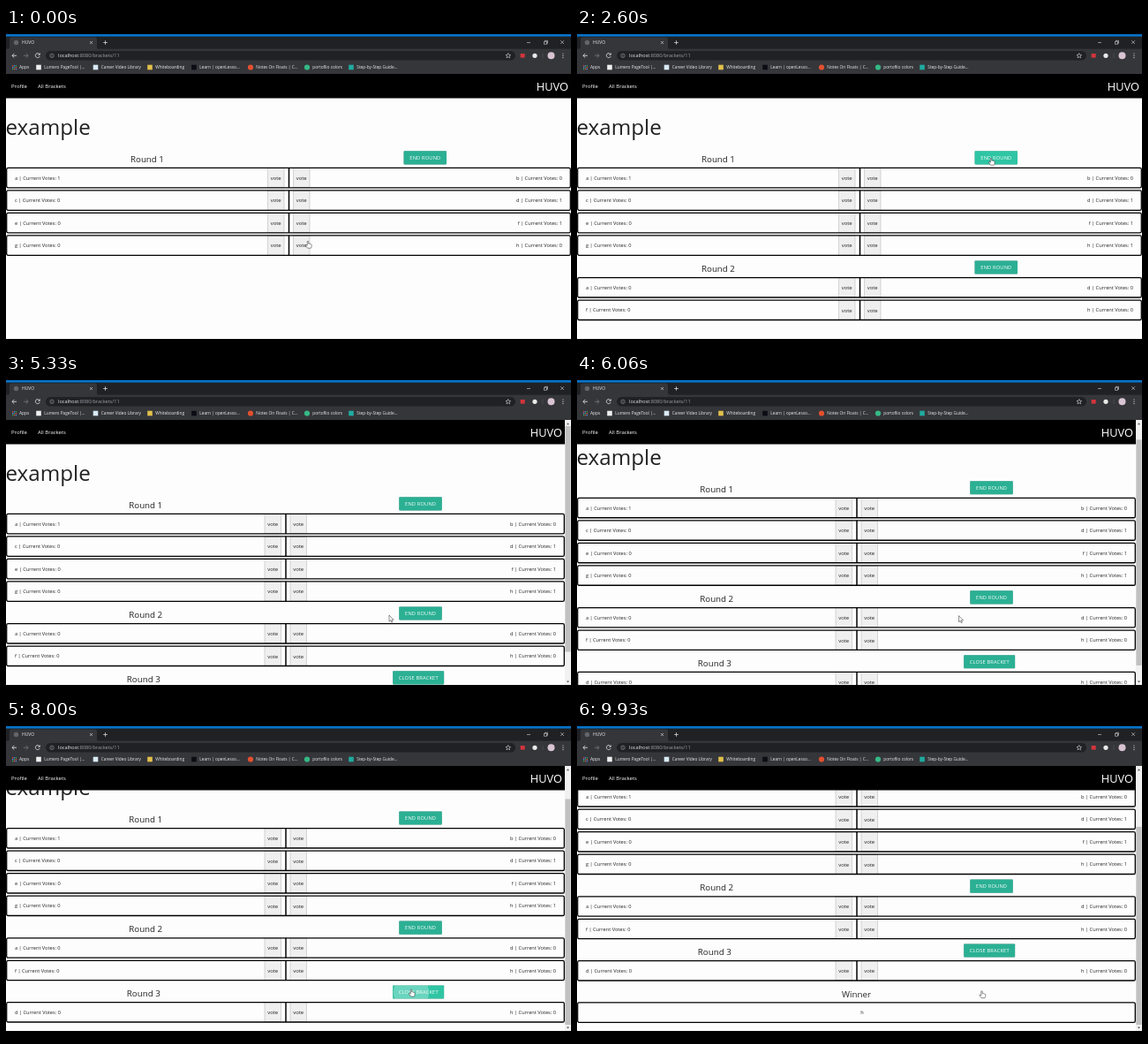
An HTML page that plays this animation: 640 px wide and 360 px high, repeating every 10 s.

```html
<!DOCTYPE html>
<html lang="en">
<head>
<meta charset="utf-8">
<title>Bracket voting</title>
<style>
  html, body { margin: 0; width: 100%; height: 100%; overflow: hidden; background: #000; }
  svg { display: block; width: 640px; height: 360px; }
  text { font-family: "Open Sans", "Noto Sans", sans-serif; white-space: pre; }
  .btn { filter: drop-shadow(0 .8px .6px rgba(0, 0, 0, .35)); }
</style>
</head>
<body>
<svg id="stage" viewBox="0 0 640 360">
  <defs>
    <clipPath id="view"><rect y="79" width="640" height="273"/></clipPath>
    <clipPath id="closeClip"><rect id="closeBox" rx=".8"/></clipPath>
  </defs>
  <rect width="640" height="360"/>
  <rect y="79" width="640" height="273" fill="#fdfdfd"/>
  <g clip-path="url(#view)"><g id="page"></g></g>
  <g id="nav"></g>
  <g id="bar"></g>
  <g id="chrome"></g>
  <g id="cursor">
    <path id="arrow" d="M0 0V7.2L1.7 5.7L2.8 8.2L3.9 7.7L2.8 5.3H5Z" fill="#fff" stroke="#222" stroke-width=".5"/>
    <path id="hand" d="M-.7.6Q0-.4.7.6V3.2L1.5 3Q2 3 2.2 3.4L3 3.3L3.4 3.8Q4.2 3.7 4.2 4.6V6Q4 7.2 3.4 8.2H-.5L-2.6 5.2Q-2.6 4.2-1.7 4.5L-.7 5.4Z" fill="#fff" stroke="#222" stroke-width=".5"/>
  </g>
</svg>
<script>
const LOOP = 10000, INK = "#222";
const VIEW_TOP = 52, VIEW_H = 300;
const $ = id => document.getElementById(id);

// Stage changes: each click reloads the page with new content.
const STAGES = [
  { at: 0,    h: 0, rounds: 1, width: 640, doc: 300 },
  { at: 900,  h: 1, rounds: 1, width: 640, doc: 300 },
  { at: 2530, h: 1, rounds: 2, width: 640, doc: 300 },
  { at: 5030, h: 1, rounds: 3, width: 633, doc: 335.8 },
  { at: 8400, h: 1, rounds: 3, width: 633, doc: 382.8, winner: true }
];
const SCROLL = [[0, 0], [5760, 0], [6330, 33.3], [6460, 35.8], [8700, 35.8], [9270, 82.8]];
const POINTER = [
  [0, 342, 241], [350, 336, 243], [1000, 336, 243], [1600, 469.5, 137], [1850, 469, 147],
  [3600, 469, 147], [4000, 465.5, 272.5], [5080, 465.5, 272.5], [5330, 434, 273],
  [5700, 434, 273], [6330, 431.5, 274], [6780, 431.5, 274], [7100, 459, 306],
  [8000, 459, 304.8], [8250, 458.5, 306.5]
];
const HAND = [[0, 1080], [1480, 3680], [3900, 5130], [7020, LOOP]];
const HOVER = [[1400, 3650], [4020, 5050], [7020, 8400]];
const RIPPLE_AT = 7860;

const ROUNDS = [
  { y: 146.8, label: "END ROUND", w: 48.5, pairs: ["a1 b0", "c0 d1", "e0 f1", "g0 h"] },
  { y: 271,   label: "END ROUND", w: 48.5, pairs: ["a0 d0", "f0 h0"] },
  { y: 343.8, label: "CLOSE BRACKET", w: 58, pairs: ["d0 h0"] }
];

const rect = (x, y, w, h, fill, more = "") =>
  `<rect x="${x}" y="${y}" width="${w}" height="${h}" fill="${fill}" ${more}/>`;
const dot = (x, y, r, fill) => `<circle cx="${x}" cy="${y}" r="${r}" fill="${fill}"/>`;
const line = (d, color, w = .8) =>
  `<path d="${d}" fill="none" stroke="${color}" stroke-width="${w}"/>`;
const text = (x, y, size, s, fill = INK, anchor = "start", more = "") =>
  `<text x="${x}" y="${y}" font-size="${size}" fill="${fill}" text-anchor="${anchor}" ${more}>${s}</text>`;
const frame = (y, w) =>
  rect(.7, y - 11.2, w - 1.4, 22.4, "none", 'rx="1.6" stroke="#000" stroke-width="1.3"');

function match(pair, y, w, hVotes) {
  const [left, right] = pair.split(" ");
  const mid = w / 2;
  const label = p => `${p[0]} | Current Votes: ${p[1] ?? hVotes}`;
  const vote = x => rect(x, y - 11, 18.5, 22, "#efefef", 'stroke="#aaa" stroke-width=".45"') +
    text(x + 9.2, y + 2.3, 5.95, "vote", INK, "middle");
  return vote(mid - 23.5) + vote(mid + 5.5) + frame(y, w) +
    line(`M${mid + .5} ${y - 11.2}v22.4`, "#000", 1.5) +
    text(10, y + 2.1, 5.67, label(left)) +
    text(w - 10, y + 2.1, 5.67, label(right), INK, "end");
}

function round(r, i, st) {
  const side = (st.width - 38 - r.w) / 4 + 2.6;
  const x = st.width - side - r.w;
  let out = text(side, r.y + 5.3, 9.75, `Round ${i + 1}`);
  out += `<g class="btn">${rect(x, r.y - 7.6, r.w, 15.2, "#2bb094", `id="btn${i}" rx=".8"`)}</g>`;
  if (i === 2) out += `<circle id="ripple" fill="#fff" clip-path="url(#closeClip)"/>`;
  out += text(x + r.w / 2 + .1, r.y + 2.1, 5.65, r.label, "#fff", "middle", 'letter-spacing=".2"');
  r.pairs.forEach((p, k) => { out += match(p, r.y + 22.8 + 25.5 * k, st.width, st.h); });
  return out;
}

function drawPage(st) {
  const w = st.width;
  let out = text(-.5, 121.3, 24.2, "example");
  ROUNDS.slice(0, st.rounds).forEach((r, i) => { out += round(r, i, st); });
  if (st.winner) {
    out += text(w / 2, 396.8, 9.75, "Winner", INK, "middle") + frame(413.9, w) +
      text(323, 416, 5.67, "h", INK, "middle");
  }
  $("page").innerHTML = out;
  const close = $("btn2");
  if (close) for (const a of ["x", "y", "width", "height"]) $("closeBox").setAttribute(a, close.getAttribute(a));

  $("nav").innerHTML = rect(0, 52, w, 27.5, "#000") +
    text(6, 68.2, 5.95, "Profile", "#fff") + text(36, 68.2, 5.95, "All Brackets", "#fff") +
    text(w - 3, 71.2, 12.8, "HUVO", "#fff", "end");

  $("bar").innerHTML = w === 640 ? "" : rect(633, VIEW_TOP, 7, VIEW_H, "#f1f1f1") +
    `<path d="M635 57.2l1.5-2l1.5 2zM635 347.5l1.5 2l1.5-2z" fill="#505050"/>` +
    rect(633.4, 59, 6.2, 286 * VIEW_H / st.doc, "#c1c1c1", 'id="thumb"');
}

function drawChrome() {
  const light = "#e8eaed", dim = "#9aa0a6";
  let out = rect(0, 7, 640, 2.8, "#0874c9") + rect(0, 9.8, 640, 14, "#202124") +
    `<path d="M2 24Q4 24 4 21V13Q4 10.5 6.500 10.500H100.500Q103 10.500 103 13V21Q103 24 105 24Z" fill="#35363a"/>` +
    rect(0, 23.5, 640, 28.5, "#35363a") +
    dot(11.5, 16.5, 2.7, "#62666b") + text(18, 18.3, 5, "HUVO", light) +
    line("M95 15l3 3m0-3l-3 3", light, .6) + line("M112.500 14.200v4.600m-2.300-2.300h4.600", light, .7) +
    line("M590 16.500h4M628.200 14.200l3.800 3.800m0-3.800l-3.800 3.800M609.500 15.300h3v3h-3zM610.500 15.300v-1h3v3h-1", light, .55);

  out += line("M12 31.300h-5m2.300-2.400l-2.400 2.400l2.400 2.400", light) +
    line("M20 31.300h5m-2.300-2.400l2.400 2.400l-2.400 2.400", "#777a7e") +
    line("M38 29.800A2.500 2.500 0 1 0 38.200 32M38.300 28.500v1.800h-1.900", light) +
    rect(45, 26, 532, 10.6, "#202124", 'rx="5.300"') +
    `<circle cx="52" cy="31.3" r="2.2" fill="none" stroke="${dim}" stroke-width=".6"/>` +
    line("M52 31v1.500m0-2.600v.6", dim, .6) +
    text(59, 33.2, 5.56, `localhost<tspan fill="${dim}">:8080/brackets/11</tspan>`, light) +
    line("M568.800 28.500l.8 1.800l2 .2l-1.500 1.300l.5 2l-1.800-1.100l-1.800 1.100l.5-2l-1.500-1.300l2-.2z", light, .55) +
    rect(582.7, 29, 5, 4.600, "#d4343c") + dot(599, 31.300, 2.600, "#e9e9e9") +
    line("M608 28.500v5.500", "#5f6368", .5) + dot(617.500, 31.300, 4, "#d8c3d3");
  for (const y of [29, 31.300, 33.600]) out += dot(631, y, .6, light);

  const hues = ["#e04a3f", "#4c8bf5", "#34a853"];
  for (let i = 0; i < 9; i++)
    out += rect(7 + i % 3 * 1.9, 42.100 + Math.floor(i / 3) * 1.9, 1.3, 1.3, hues[(i + Math.floor(i / 3)) % 3]);
  out += text(15, 46.4, 4.92, "Apps", light);
  const marks = [
    [37, "#eee", "Lumero PageTool |..."], [101.500, "#d9eaf4", "Career Video Library"],
    [163, "#e1c04b", "Whiteboarding"], [213, "#0c0c14", "Learn | openLesso..."],
    [277, "#e2502f", "Notes On Floats | C..."], [341, "#35b985", "portoflio colors"],
    [391, "#20aaa0", "Step-by-Step Guide..."]
  ];
  marks.forEach(([x, color, label], i) => {
    out += (i === 4 || i === 5 ? dot(x, 44.500, 3.100, color) : rect(x - 2.800, 41.700, 5.600, 5.600, color)) +
      text(x + 6.300, 46.4, 4.75, label, light);
  });
  $("chrome").innerHTML = out;
}

const clamp = v => Math.max(0, Math.min(1, v));

// Eased interpolation through a table of [time, ...values].
function sample(keys, t) {
  const i = keys.findIndex(k => k[0] > t);
  if (i < 0) return keys[keys.length - 1].slice(1);
  const [a, b] = [keys[i - 1], keys[i]];
  const u = (t - a[0]) / (b[0] - a[0]), e = u * u * (3 - 2 * u);
  return a.slice(1).map((v, k) => v + (b[k + 1] - v) * e);
}

function mix(u) {
  const from = [43, 176, 148], to = [47, 197, 164];
  return `rgb(${from.map((v, i) => Math.round(v + (to[i] - v) * u))})`;
}

let shown = null;
function render(t) {
  const st = STAGES.filter(s => s.at <= t).pop();
  if (st !== shown) drawPage(shown = st);

  const [scroll] = sample(SCROLL, t);
  $("page").setAttribute("transform", `translate(0 ${-scroll})`);
  if ($("thumb")) $("thumb").setAttribute("y", 59 + 286 * scroll / st.doc);

  HOVER.forEach(([on, off], i) => {
    const btn = $("btn" + i);
    if (btn) btn.setAttribute("fill", mix(clamp((t - on) / 200) * clamp((off + 200 - t) / 200)));
  });

  const ripple = $("ripple");
  if (ripple) {
    const u = clamp((t - RIPPLE_AT) / 420);
    ripple.setAttribute("cx", 459);
    ripple.setAttribute("cy", 344);
    ripple.setAttribute("r", 60 * u);
    ripple.setAttribute("opacity", t < RIPPLE_AT ? 0 : .28 * clamp((8400 - t) / 250));
  }

  const [x, y] = sample(POINTER, t);
  const hand = HAND.some(([a, b]) => t >= a && t < b);
  $("cursor").setAttribute("transform", `translate(${x} ${y})`);
  $("hand").setAttribute("visibility", hand ? "visible" : "hidden");
  $("arrow").setAttribute("visibility", hand ? "hidden" : "visible");
}

drawChrome();
const start = performance.now();
function tick() {
  render((performance.now() - start) % LOOP);
  requestAnimationFrame(tick);
}
tick();
</script>
</body>
</html>
```
